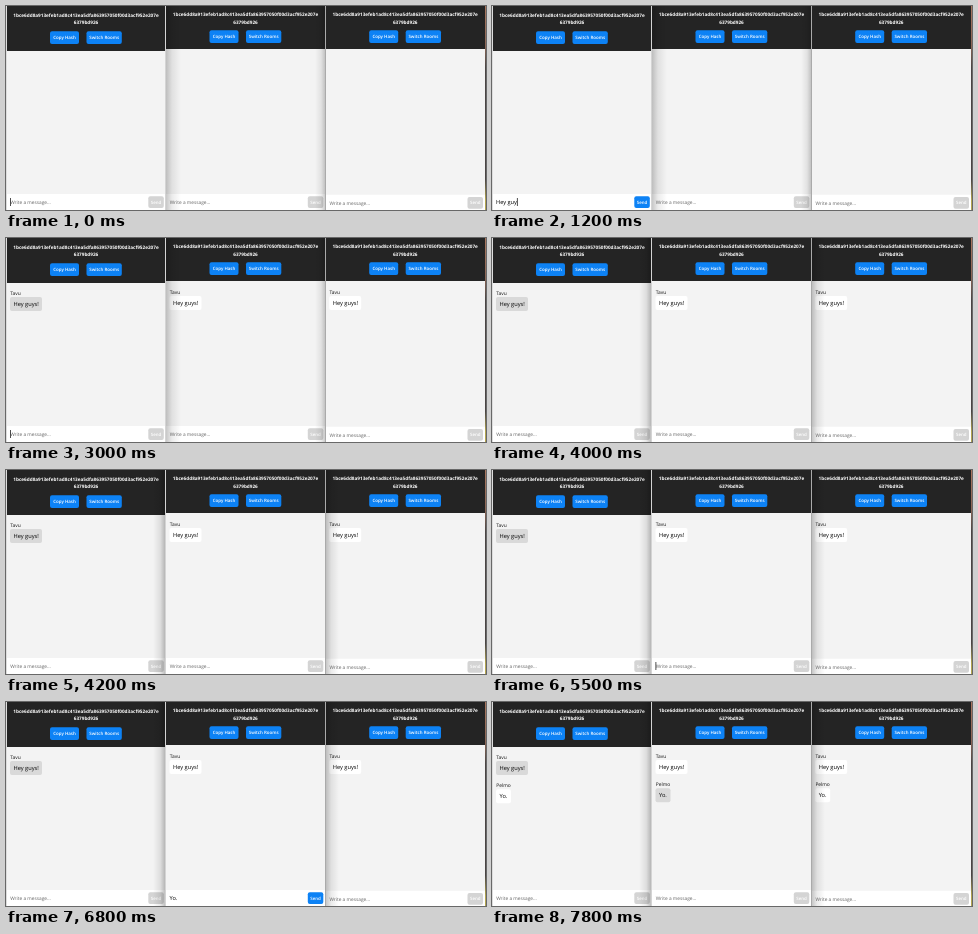
Animation of 480 by 204 pixels, one loop 8000 ms. Source, as an HTML page with a canvas:

```html
<!DOCTYPE html>
<html lang="en">
<head>
<meta charset="utf-8">
<title>Chat rooms</title>
<style>
  html, body { margin: 0; width: 100%; height: 100%; overflow: hidden; background: #f3f3f3; }
  canvas { display: block; width: 480px; height: 204px; }
</style>
</head>
<body>
<canvas id="stage"></canvas>
<script>
const W = 480, H = 204, LOOP = 8000;
const BLUE = '#0d82f5', GREY = '#d9d9d9';
const HASH = ['1bce6dd8a913efeb1ad8c413ea5dfa863957050f00d3acf952e207e', '6379bd926'];

const canvas = document.getElementById('stage');
const ctx = canvas.getContext('2d');
const ratio = window.devicePixelRatio || 1;
canvas.width = W * ratio;
canvas.height = H * ratio;
ctx.scale(ratio, ratio);
ctx.textRendering = 'geometricPrecision';

// x: left of the content, header: its height, dy: offset of the page, inputDy: offset of the input row
const windows = [
  { x: 0, header: 45, dy: 0, inputDy: 0 },
  { x: 159.5, header: 43, dy: -1, inputDy: 0 },
  { x: 319.2, header: 43, dy: -1, inputDy: 0.7 }
];

const messages = [
  { at: 2000, from: 0, name: 'Tavu', text: 'Hey guys!', y: 55, width: 32 },
  { at: 7000, from: 1, name: 'Pelmo', text: 'Yo.', y: 83.3, width: 15 }
];

// Time of each key press, the time of sending and the window typed in
const drafts = [
  { panel: 0, text: 'Hey guys!', keys: [500, 600, 700, 800, 1000, 1100, 1200, 1300, 1400], sent: 2000 },
  { panel: 1, text: 'Yo.', keys: [5700, 5800, 6000], sent: 7000 }
];

// Spans in which the caret is visible
const carets = [
  [[0, 100], [500, 2500], [3000, 3500]],
  [[4500, 5000], [5500, 6500], [7000, 7500]]
];

function box(x, y, w, h, color, radius = 0) {
  ctx.fillStyle = color;
  ctx.beginPath();
  ctx.roundRect(x, y, w, h, radius);
  ctx.fill();
}

function label(text, x, y, size, color, { weight = 400, align = 'left' } = {}) {
  ctx.font = `${weight} ${size}px "Open Sans", sans-serif`;
  ctx.textAlign = align;
  ctx.fillStyle = color;
  ctx.fillText(text, x, y + size * 0.36);
  return ctx.measureText(text).width;
}

function button(text, x, y, w, h, color) {
  box(x, y, w, h, color, 2);
  label(text, x + w / 2, y + h / 2, 4.45, '#fff', { weight: 600, align: 'center' });
}

function shadow(from, to, strength) {
  const fade = ctx.createLinearGradient(from, 0, to, 0);
  fade.addColorStop(0, `rgba(0,0,0,${strength})`);
  fade.addColorStop(0.4, `rgba(0,0,0,${strength * 0.35})`);
  fade.addColorStop(1, 'rgba(0,0,0,0)');
  box(Math.min(from, to), 0, Math.abs(to - from), H, fade);
}

function drawHeader(height, dy) {
  box(0, 0, 160, height, '#242424');
  HASH.forEach((line, i) =>
    label(line, 80, 9 + dy * 0.6 + i * 7.5, 4.68, '#fff', { weight: 700, align: 'center' }));
  button('Copy Hash', 44, 25.2 + dy, 29, 12.8, BLUE);
  button('Switch Rooms', 80.5, 25.2 + dy, 35.3, 12.8, BLUE);
}

function drawMessage({ from, name, text, y, width }, panel) {
  label(name, 4.2, y, 4.9, '#111');
  box(4, y + 4, width, 14, from === panel ? GREY : '#fff', 2);
  label(text, 7.5, y + 11, 5.7, '#000');
}

function drawInput(panel, t) {
  const draft = drafts.find(d => d.panel === panel && t >= d.keys[0] && t < d.sent);
  const typed = draft ? draft.text.slice(0, draft.keys.filter(k => k <= t).length) : '';
  const y = 196.3;
  box(0, 188, 160.5, 16, '#fff');
  let end = 0;
  if (typed) end = label(typed, 4, y - 0.3, 5.65, '#000');
  else label('Write a message...', 4.2, y, 4.8, '#666');
  button('Send', 142.3, 190.3, 15.5, 11.7, typed ? BLUE : '#d4d4d4');
  if ((carets[panel] || []).some(([on, off]) => t >= on && t < off)) {
    box(4 + end, 192, 0.8, 8, '#222');
  }
}

function drawWindow({ x, header, dy, inputDy }, panel, t) {
  ctx.save();
  ctx.translate(x, 0);
  box(0, 0, 160.5, H, '#f3f3f3');
  drawHeader(header, dy);
  for (const m of messages) {
    if (t >= m.at) drawMessage({ ...m, y: m.y + dy }, panel);
  }
  ctx.translate(0, inputDy);
  drawInput(panel, t);
  ctx.restore();
}

function drawEdges() {
  box(0, 0, 1, H, '#ddd');
  box(159, 0, 1, H, '#d4d4d4');
  box(319, 0, 1, H, '#aaa');
  const desktop = ctx.createLinearGradient(0, 0, 0, H);
  desktop.addColorStop(0, '#a9765e');
  desktop.addColorStop(0.2, '#8a6656');
  desktop.addColorStop(0.3, '#4a4544');
  desktop.addColorStop(0.85, '#4a4544');
  desktop.addColorStop(0.95, '#b5a650');
  box(479, 0, 1, H, desktop);
}

function draw(t) {
  windows.forEach((win, panel) => drawWindow(win, panel, t));
  if (t < 4000) {
    shadow(160, 175, 0.22);
    shadow(319, 309, 0.2);
  } else {
    shadow(159, 147, 0.25);
    shadow(320, 333, 0.22);
  }
  drawEdges();
}

const start = performance.now();
function tick() {
  draw((performance.now() - start) % LOOP);
  requestAnimationFrame(tick);
}
tick();
</script>
</body>
</html>
```
